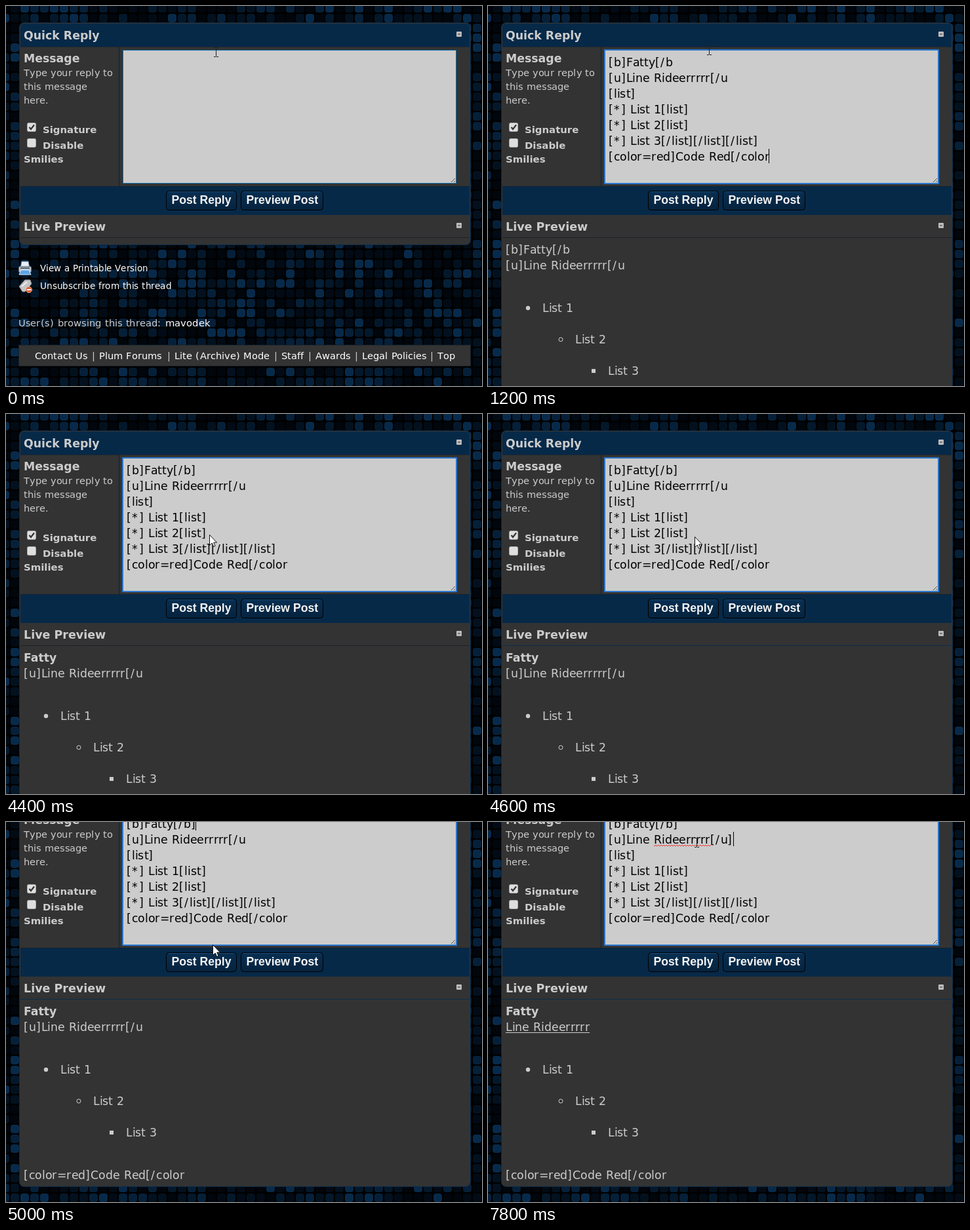
Write an HTML page with a canvas that moves like this. It is 726x580 px and loops after 8000 ms.

```html
<!DOCTYPE html>
<html lang="en">
<head>
<meta charset="utf-8">
<title>Quick reply</title>
<style>
html, body { margin: 0; width: 100%; height: 100%; overflow: hidden; background: #000; }
canvas { display: block; }
</style>
</head>
<body>
<canvas id="stage" width="726" height="580"></canvas>
<script>
const stage = document.getElementById('stage');
const ctx = stage.getContext('2d');
const LOOP = 8000;
const SANS = '"DejaVu Sans", sans-serif';
const NAVY = '#072948', GREY = '#333333', PALE = '#cccccc';

// Extra advance, in em, for glyphs that need more room
const ROOM = { '[': .064, ']': .064, '/': .117, '*': .136, ' ': .034, '(': .06, ')': .06, r: .012 };

// Timelines: [time, ...value]; a value holds until the next entry
const CARET = [
  [0], [600, 184, 0], [1000, 428, 6], [1600], [2000, 428, 6], [2200, 306, 4], [2400, 281, 0],
  [3000], [3600, 289, 0], [4200], [4800, 289, 0], [5200, 366, 1], [5800], [6400, 366, 1],
  [6800, 374, 1], [7400], [7800, 374, 1]
];
const POINTER = [
  [0, beam, 320, 70], [200, beam, 328, 60], [400, beam, 334, 49], [600, beam, 337, 44],
  [1200, beam, 337, 67], [1400, beam, 338, 60], [1600, beam, 338, 53], [1800, beam, 338, 47],
  [2000, beam, 338, 43], [2200], [4200, arrow, 306, 172], [4400, arrow, 310, 184],
  [4600, arrow, 315, 187], [5400], [7800, beam, 318, 31]
];
const SCROLL = [[0, 0], [4800, 43], [5000, 83]];

function at(track, t) {
  return track.filter(step => step[0] <= t).pop().slice(1);
}

function rect(x, y, w, h, color) {
  ctx.fillStyle = color;
  ctx.fillRect(x, y, w, h);
}

function round(x, y, w, h, r, fill, stroke) {
  ctx.beginPath();
  ctx.roundRect(x, y, w, h, r);
  if (fill) { ctx.fillStyle = fill; ctx.fill(); }
  if (stroke) { ctx.strokeStyle = stroke; ctx.lineWidth = 1; ctx.stroke(); }
}

function path(points, fill, stroke, width = 1) {
  ctx.beginPath();
  points.forEach(([x, y], i) => i ? ctx.lineTo(x, y) : ctx.moveTo(x, y));
  if (fill) { ctx.closePath(); ctx.fillStyle = fill; ctx.fill(); }
  if (stroke) { ctx.strokeStyle = stroke; ctx.lineWidth = width; ctx.stroke(); }
}

function disc(x, y, r, fill, stroke) {
  ctx.beginPath();
  ctx.arc(x, y, r, 0, Math.PI * 2);
  if (fill) { ctx.fillStyle = fill; ctx.fill(); }
  if (stroke) { ctx.strokeStyle = stroke; ctx.lineWidth = 1; ctx.stroke(); }
}

// Glyphs sit on whole pixels, as hinted screen text does
function text(s, x, y, size = 17.33, color = PALE) {
  ctx.font = `${size}px ${SANS}`;
  ctx.fillStyle = color;
  for (const c of s) {
    ctx.fillText(c, Math.round(x), y);
    x += ctx.measureText(c).width + (ROOM[c] || 0) * size;
  }
  return x;
}

function bold(s, x, y, size = 17.33, color = PALE, family = SANS) {
  ctx.font = `bold ${size}px ${family}`;
  ctx.fillStyle = color;
  ctx.fillText(s, x, y);
}

function makeBackdrop() {
  const layer = document.createElement('canvas');
  layer.width = 726;
  layer.height = 580;
  const g = layer.getContext('2d');
  const shades = ['#01060c', '#020b15', '#03111f', '#04182b', '#062039', '#082a4a'];
  let seed = 41;
  const random = () => (seed = seed * 16807 % 2147483647) / 2147483647;
  g.fillStyle = '#000';
  g.fillRect(0, 0, 726, 580);
  for (let y = -3; y < 580; y += 15) {
    for (let x = -8; x < 726; x += 15) {
      g.fillStyle = shades[Math.floor(random() ** 1.4 * shades.length)];
      g.beginPath();
      g.roundRect(x, y, 13, 13, 4);
      g.fill();
    }
  }
  return layer;
}
const backdrop = makeBackdrop();

function beam(x, y) {
  ctx.fillStyle = '#222';
  ctx.fillRect(x, y - 6, 1, 13);
  for (const dy of [-7, 7]) {
    ctx.fillRect(x - 3, y + dy, 3, 1);
    ctx.fillRect(x + 1, y + dy, 3, 1);
  }
}

function arrow(x, y) {
  const shape = [[0, 0], [0, 16], [3.7, 12.5], [6.2, 18], [8.6, 17], [6.2, 11.6], [11, 11.6], [0, 0]];
  path(shape.map(([dx, dy]) => [x + dx + .5, y + dy + .5]), '#fff', '#111');
}

function collapseIcon(y) {
  round(687, y, 8, 8, 1, '#bdbdbd');
  rect(689, y + 3, 4, 2, '#777');
}

function checkbox(y, checked) {
  round(32.5, y + .5, 13, 13, 2, '#dedede', '#aaa');
  if (checked) path([[35.5, y + 7], [38, y + 10], [43, y + 3.5]], null, '#333', 2.2);
}

function button(x, w, label) {
  const fill = ctx.createLinearGradient(0, 282, 0, 311);
  fill.addColorStop(0, '#092f52');
  fill.addColorStop(.5, NAVY);
  fill.addColorStop(1, '#06233e');
  round(x + .5, 282.5, w - 1, 29, 4, fill, '#000');
  rect(x + 4, 283, w - 8, 1, '#1b4f80');
  bold(label, x + 8.5, 302, 17.6, '#f4f4f4', '"Liberation Sans", Arial, sans-serif');
}

function textarea(t, pasted) {
  if (t >= 600) round(177, 66, 511, 206, 1, '#2b78cf');
  else rect(178, 67, 509, 204, '#1272b0');
  rect(179, 68, 507, 202, PALE);
  path([[679, 269], [685, 263]], null, '#555');
  path([[683, 269], [685, 267]], null, '#555');

  if (pasted) {
    const lines = [
      '[b]Fatty[/b' + (t >= 3600 ? ']' : ''),
      '[u]Line Rideerrrrr[/u' + (t >= 6800 ? ']' : ''),
      '[list]',
      '[*] List 1[list]',
      '[*] List 2[list]',
      '[*] List 3[/list][/list][/list]',
      '[color=red]Code Red[/color'
    ];
    lines.forEach((line, i) => text(line, 184, 92 + 24 * i, 17.33, '#000'));
  }
  if (t >= 6800) {
    const wave = Array.from({ length: 88 }, (_, i) => [253 + i, 119 + Math.sin(i * Math.PI / 2)]);
    path(wave, null, '#e33');
  }
  const [x, line] = at(CARET, t);
  if (x) rect(x, 74 + 24 * line, 1, 22, '#000');
}

function preview(t) {
  if (t >= 3600) bold('Fatty', 27, 378);
  else text('[b]Fatty[/b', 27, 378);

  if (t >= 6800) {
    const end = text('Line Rideerrrrr', 27, 402);
    rect(27, 404, end - 27, 1, PALE);
  } else {
    text('[u]Line Rideerrrrr[/u', 27, 402);
  }
  disc(61, 461, 3.2, PALE);
  disc(111, 509, 3, null, PALE);
  rect(158, 554, 6, 6, PALE);
  for (let i = 0; i < 3; i++) text('List ' + (i + 1), 83 + 50 * i, 467 + 48 * i);
  text('[color=red]Code Red[/color', 27, 628);
}

function panel(t, pasted) {
  const bottom = pasted ? 640 : 365;
  round(20.5, 25.5, 688, bottom - 26, 7, GREY, '#0b2c4b');
  round(22, 27, 685, 35, [5, 5, 0, 0], NAVY);
  rect(22, 62, 685, 1, '#1d2731');
  rect(172, 63, 1, 213, '#0b2237');
  rect(22, 275, 685, 1, '#0b2237');
  rect(22, 276, 685, 43, NAVY);
  rect(22, 353, 685, 1, t >= 4600 ? '#0c2d4b' : '#1c2228');

  bold('Quick Reply', 27, 51);
  collapseIcon(39);
  bold('Message', 27, 86);
  ['Type your reply to', 'this message', 'here.'].forEach((s, i) => text(s, 27, 107 + 21 * i, 14.6));
  checkbox(178, true);
  checkbox(202, false);
  bold('Signature', 56, 194, 14.9);
  bold('Disable', 56, 218, 14.9);
  bold('Smilies', 27, 239, 14.9);
  textarea(t, pasted);
  button(244, 108, 'Post Reply');
  button(358, 126, 'Preview Post');
  bold('Live Preview', 27, 343, 17.5);
  collapseIcon(331);
  if (pasted) preview(t);
}

function printerIcon() {
  path([[24, 390], [34, 390], [36, 400], [22, 400]], '#e8f1fa', '#7794b0');
  round(19.5, 397.5, 19, 9, 2, '#b9c4cf', '#66727e');
  rect(22, 399, 14, 2, '#56616c');
  path([[23, 403], [35, 403], [38, 410], [20, 410]], '#5ba4e6', '#dbe9f5');
}

function unsubscribeIcon() {
  path([[20, 428], [29, 418], [37, 418], [39, 424], [29, 436], [25, 436]], '#c4c4c4', '#888');
  path([[24, 428], [32, 421]], null, '#eee', 2);
  disc(35, 433, 4.5, '#dd5b35', '#f0b090');
  rect(32, 432, 6, 2, '#fff');
}

function footer() {
  printerIcon();
  unsubscribeIcon();
  text('View a Printable Version', 52, 405, 13.4, '#fff');
  text('Unsubscribe from this thread', 52, 432, 13.6, '#fff');
  text('User(s) browsing this thread:', 19, 489, 14.7);
  text('mavodek', 243, 489, 14.8, '#fff');

  rect(19, 517, 690, 33, '#17222c');
  rect(20, 518, 688, 31, GREY);
  const links = [
    ['Contact Us', 44], ['Plum Forums', 142], ['Lite (Archive) Mode', 257], ['Staff', 420],
    ['Awards', 472], ['Legal Policies', 543], ['Top', 658]
  ];
  links.forEach(([label, x], i) => {
    text(label, x, 539, 14.6, '#fff');
    if (i) text('|', x - 11, 539, 14.6);
  });
}

function draw(t) {
  const pasted = t >= 1000;
  const [scroll] = at(SCROLL, t);
  ctx.drawImage(backdrop, 0, 0);
  ctx.save();
  ctx.translate(0, -scroll);
  panel(t, pasted);
  ctx.translate(0, pasted ? 275 : 0);
  footer();
  ctx.restore();
  const [pointer, x, y] = at(POINTER, t);
  if (pointer) pointer(x, y);
}

const start = performance.now();
function tick() {
  draw((performance.now() - start) % LOOP);
  requestAnimationFrame(tick);
}
tick();
</script>
</body>
</html>
```
